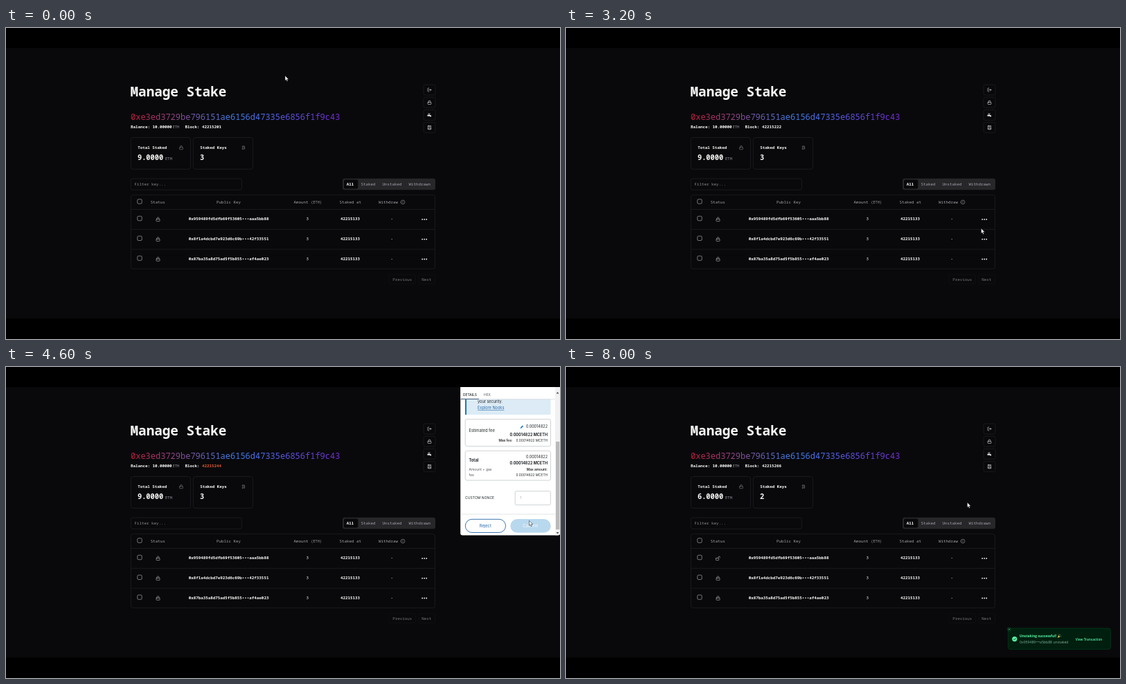
Recreate the animation shown at these times as an HTML page. Size 800 by 450 pixels, loop 8.1 s.

```html
<!DOCTYPE html>
<html lang="en">
<head>
<meta charset="utf-8">
<title>Manage Stake</title>
<style>
  html, body { margin: 0; width: 100%; height: 100%; overflow: hidden; background: #000; }
  svg { display: block; width: 100vw; height: 100vh; }
  text { white-space: pre; }
  .mono { font-family: "Noto Sans Mono", "DejaVu Sans Mono", monospace; }
  .wallet { font-family: Inter, sans-serif; }
  .toast { font-family: "Open Sans", sans-serif; }
  .icon { fill: none; stroke-width: 2; stroke-linecap: round; stroke-linejoin: round; }
</style>
</head>
<body>
<svg id="stage" viewBox="0 0 800 450"></svg>
<script>
const LOOP = 8100, STEP = 100;
const GREY = '#a1a1aa', WHITE = '#fafafa', EDGE = '#222226', BLUE = '#2767a8';

const text = (x, y, s, { size = 5.85, fill = WHITE, weight = 500, anchor = 'start', id = '', extra = '' } = {}) =>
  `<text x="${x}" y="${y}" font-size="${size}" fill="${fill}" font-weight="${weight}" text-anchor="${anchor}"${id && ` id="${id}"`} ${extra}>${s}</text>`;
const box = (x, y, x2, y2, r, stroke, fill = 'none', extra = '') =>
  `<rect x="${x}" y="${y}" width="${x2 - x}" height="${y2 - y}" rx="${r}" stroke="${stroke}" fill="${fill}" stroke-width=".7" ${extra}/>`;
const line = (x, y, x2, color, w = .7) =>
  `<path d="M${x} ${y}H${x2}" stroke="${color}" stroke-width="${w}"/>`;

// Icons on a 24-unit grid, centred on x, y
const ICONS = {
  exit: 'M9 21H5a2 2 0 0 1-2-2V5a2 2 0 0 1 2-2h4M16 17l5-5-5-5M21 12H9',
  lock: 'M5 11H19a2 2 0 0 1 2 2V20a2 2 0 0 1-2 2H5a2 2 0 0 1-2-2V13a2 2 0 0 1 2-2ZM7 11V7a5 5 0 0 1 10 0v4',
  open: 'M3 11H14a2 2 0 0 1 2 2V20a2 2 0 0 1-2 2H3a2 2 0 0 1-2-2V13a2 2 0 0 1 2-2ZM13 11V7a4.500 4.500 0 0 1 9 0v2',
  tap: 'M3 12H14q7 0 7 8H16q0-3-3-3H3ZM10 11V6M5 5H15',
  book: 'M6 2H20V22H6a2 2 0 0 1-2-2V4a2 2 0 0 1 2-2ZM4 18H20M9 7H15M9 11H15',
  binary: 'M14 16a2 2 0 0 1 4 0v2a2 2 0 0 1-4 0ZM6 6a2 2 0 0 1 4 0v2a2 2 0 0 1-4 0ZM6 20h4M14 10h4M6 14h2v6M14 4h2v6',
  info: 'M2 12a10 10 0 1 0 20 0a10 10 0 1 0-20 0M12 16V11M12 8V7.900',
  pencil: 'M3 21l1-6L16 3l5 5L9 20Z'
};
const icon = (name, x, y, size = 7, color = WHITE, extra = '') =>
  `<path class="icon" d="${ICONS[name]}" stroke="${color}" transform="translate(${x} ${y}) scale(${size / 24}) translate(-12 -12)" ${extra}/>`;

function page() {
  let s = '<rect y="29" width="800" height="391.500" fill="#09090b"/>';
  s += text(179.5, 98.5, 'Manage Stake', { size: 19.3, weight: 700 });
  s += text(180, 133, '0xe3ed3729be796151ae6156d47335e6856f1f9c43', { size: 12, fill: 'url(#hue)' });
  s += text(180, 145.3, 'Balance: 10.00000', { weight: 600 });
  s += text(241, 145.3, 'ETH', { size: 5, fill: GREY });
  s += text(258.5, 145.3, 'Block:', { weight: 600 }) + text(283, 145.3, '', { weight: 600, id: 'block' });

  ['exit', 'lock', 'tap', 'book'].forEach((name, i) => {
    const y = 89.5 + i * 18.2;
    s += box(603, y - 7.5, 620, y + 7.5, 2.5, EDGE);
    s += icon(name, 611.5, y, 6.5, WHITE, name === 'tap' ? 'style="fill:#fafafa"' : '');
  });

  s += box(180.3, 158.5, 266.5, 204.3, 3.5, EDGE) + box(270.3, 158.5, 356.5, 204.3, 3.5, EDGE);
  s += text(190.3, 174.8, 'Total Staked', { weight: 600 }) + icon('lock', 253, 173, 6.5, '#8b8b92');
  s += text(280.3, 174.8, 'Staked Keys', { weight: 600 }) + icon('binary', 343, 173, 7, '#8b8b92');
  s += text(190, 190.8, '', { size: 10.3, weight: 700, id: 'total' });
  s += text(230, 190.6, 'ETH', { size: 5.6, fill: GREY });
  s += text(280, 190.8, '', { size: 10.3, weight: 700, id: 'keys' });

  s += box(180.3, 218, 340.3, 234.2, 2.5, EDGE) + text(185.5, 228, 'Filter key...', { fill: '#8b8b92' });
  s += box(486, 217.7, 620, 234.2, 3, 'none', '#27272a') + box(488, 219.5, 508.3, 232.5, 2, 'none', '#09090b');
  s += text(491.8, 228, 'All', { weight: 600 });
  [[512.5, 'Staked'], [543.5, 'Unstaked'], [581.5, 'Withdrawn']].forEach(([x, label]) =>
    s += text(x, 228, label, { fill: GREY }));

  s += box(180.4, 241.6, 619.4, 348.6, 3, EDGE);
  const head = { fill: GREY };
  [[208.8, 'Status'], [304, 'Public Key'], [415.5, 'Amount'], [481.5, 'Staked at'], [538, 'Withdraw']]
    .forEach(([x, label]) => s += text(x, 253.8, label, head));
  s += text(440.5, 253.8, '(ETH)', { size: 5.1, fill: GREY }) + icon('info', 573, 252, 7, GREY);
  const check = y => box(189.8, y - 3.2, 196.2, y + 3.2, 1.5, '#a8a8ad');
  s += check(251);
  ['959489fd5dfb69f53605•••aaa5bb88', '8f1a4dcbd7e923d6c69b•••42f33551', '87ba35a8d75ad5f5b855•••af4ae023']
    .forEach((key, i) => {
      const y = 276.4 + i * 28.8, mid = { anchor: 'middle' };
      s += line(180.5, y - 13.9, 619.5, EDGE) + check(y - .9);
      s += icon('lock', 219.5, y + .4, 6.8, '#c4c4c8', i ? '' : 'id="shut"');
      if (!i) s += icon('open', 219.5, y + .4, 6.8, '#c4c4c8', 'id="freed"');
      s += text(263.7, y + 1.8, '0x' + key, { weight: 600 });
      s += text(435.3, y + 1.8, '3', mid) + text(497, y + 1.8, '42215133', { ...mid, weight: 600 });
      s += text(557.3, y + 1.8, '-', mid);
      [601.2, 604.2, 607.2].forEach(x => s += `<circle cx="${x}" cy="${y + .5}" r=".9" fill="#fafafa"/>`);
    });

  s += box(553, 357, 591.5, 370.3, 2.5, '#141417') + text(558.2, 365.6, 'Previous', { fill: '#77777d' });
  s += box(596, 357, 619.5, 370.3, 2.5, '#141417') + text(600.3, 365.6, 'Next', { fill: '#77777d' });
  s += `<g id="menu">${box(569, 285.3, 618.5, 300, 2.5, '#303034', '#27272a')}${icon('open', 575.7, 292.2, 6.5)}${text(582.3, 294.2, 'Unstake')}</g>`;
  return `<g class="mono">${s}</g>`;
}

function wallet() {
  const ink = '#24272a', soft = '#555a60', edge = '#bbc0c5', fee = '0.00014822', coin = fee + ' MCETH';
  const right = (y, s, size, weight = 400) => text(782, y, s, { size, weight, fill: ink, anchor: 'end' });
  const left = (x, y, s, size = 5.1, o = {}) => text(x, y, s, { size, fill: ink, weight: 400, ...o });
  let s = box(663, 20, 786.5, 69, 1.5, 'none', '#dcebf6') + '<path d="M664 20V69" stroke="#1878c2" stroke-width="2"/>';
  s += left(681, 52, 'your security.', 5.6);
  s += left(681, 61.3, 'Explore Nooks', 5.6, { fill: BLUE, extra: 'text-decoration="underline"' });
  s += box(663.2, 75.5, 786.5, 114.7, 2.5, edge) + left(668.5, 93.5, 'Estimated fee', 5.8);
  s += icon('pencil', 745, 86.6, 5, '#1878c2', 'style="fill:#1878c2"');
  s += right(88.4, fee, 5.5) + right(100.1, coin, 5.5, 700) + right(108.4, coin, 4.75);
  s += left(711.5, 108.4, 'Max fee:', 4.8, { weight: 600 });
  s += box(663.2, 121.3, 786.5, 164, 2.5, edge) + left(668.5, 136.8, 'Total', 5.7, { weight: 700 });
  s += right(132, fee, 5.5) + right(141.3, coin, 5.5, 700) + right(149.8, 'Max amount:', 4.8, 600) + right(158.1, coin, 4.75);
  s += left(668.5, 149.8, 'Amount + gas', 5, { fill: soft }) + left(668.5, 158.1, 'fee', 5, { fill: soft });
  s += left(663, 190.7, 'CUSTOM NONCE') + box(735.2, 179.6, 786.3, 199.6, 2, edge) + left(742, 191.3, '1', 5.1, { fill: '#9fa6ae' });
  s += line(656, 213, 793, '#d6d9dc');
  s += box(663.3, 220.3, 721.5, 239.5, 9.6, BLUE, '#fff', 'style="stroke-width:.9"');
  s += left(692.3, 231.6, 'Reject', 5.8, { fill: BLUE, anchor: 'middle' });
  s += box(728.3, 220, 786.7, 239.8, 9.9, 'none', '#b8d8ee', 'id="confirm"');
  s += left(757.3, 231.6, 'Confirm', 5.8, { fill: '#fff', anchor: 'middle' });

  const head = box(656.5, 29, 793, 46.5, 0, 'none', '#fff') + left(660, 41.7, 'DETAILS', 4.9, { weight: 500 }) +
    left(690, 41.7, 'HEX', 4.9, { fill: soft }) + line(656.5, 46.6, 793, '#d6d9dc') + line(656.5, 46.3, 683, '#3c5878', 1);
  const bar = box(793, 29, 800, 243.5, 0, 'none', '#f1f1f1') + box(794, 108, 799.3, 235, 0, 'none', '#b9b9b9', 'id="thumb"') +
    '<path d="M794.500 38.500l2-2.500 2 2.500ZM794.500 239l2 2.500 2-2.500Z" fill="#505050"/>';
  const loader = '<circle cx="729" cy="103" r="31" fill="#e2761b"/>' +
    '<path id="spin" d="M728 143a5 5 0 1 0 5 5" fill="none" stroke="#f08030" stroke-width="1.300"/>';
  return `<g clip-path="url(#screen)"><g id="popup" class="wallet">
    <rect id="panel" x="656.200" y="0" width="144" height="243.500" rx="3"/>
    <g id="loader">${loader}</g>
    <g id="details" clip-path="url(#sheet)"><g id="scroll">${s}</g>${head}${bar}</g></g></g>`;
}

function toast(done) {
  const key = '0x959489•••a5bb88', mint = '#59f3a6';
  const tone = done ? { bg: '#001f0f', edge: '#003d1c', ink: mint, sub: '#7fae95' }
                    : { bg: '#09090b', edge: EDGE, ink: WHITE, sub: '#a0a0a5' };
  const r = done ? 2.8 : 3.9, d = r * .36;
  let s = box(638.4, 378, 786.6, 408.6, 3.5, tone.edge, tone.bg);
  s += `<circle cx="640" cy="379.600" r="${r}" fill="${tone.bg}" stroke="${done ? '#0b4a29' : '#66666b'}" stroke-width=".6"/>`;
  s += `<path d="M${640 - d} ${379.6 - d}l${2 * d} ${2 * d}m0 ${-2 * d}l${-2 * d} ${2 * d}" stroke="${done ? mint : '#c0c0c4'}" stroke-width=".6"/>`;
  s += done
    ? `<circle cx="647.800" cy="393.600" r="3.600" fill="${mint}"/><path d="M646.200 393.700l1.200 1.200 2.200-2.500" fill="none" stroke="#001f0f" stroke-width=".8"/>`
    : '<circle id="busy" cx="647.500" cy="393.700" r="2.700" fill="none" stroke="#45454a" stroke-width="1" stroke-dasharray=".5 .914"/>';
  s += text(655, 391.3, done ? 'Unstaking successful!' : 'Unstaking...', { size: 4.95, weight: 700, fill: tone.ink });
  if (done) s += '<path d="M709.700 391.800l1.600-3.700 2.200 2.300Z" fill="#d9c75a"/><path d="M713 388.200l1-1M714 389.800h1.200M712 387.500v-1" stroke="#8fd0a0" stroke-width=".7"/>';
  s += text(655, 400.2, done ? key + ' unstaked' : 'Unstaking ' + key, { size: 5.15, weight: 400, fill: tone.sub });
  if (!done) s += box(730.2, 386, 780, 401.3, 2.5, '#1d1d20');
  s += text(755, 395.7, 'View Transaction', { size: 4.75, weight: 600, fill: tone.ink, anchor: 'middle' });
  return `<g id="${done ? 'success' : 'pending'}" class="toast">${s}</g>`;
}

const stage = document.getElementById('stage');
stage.innerHTML = `<defs>
  <linearGradient id="hue" gradientUnits="userSpaceOnUse" x1="180" x2="482">
    <stop stop-color="#c41c3c"/><stop offset=".5" stop-color="#4080ee"/><stop offset="1" stop-color="#7428d4"/></linearGradient>
  <clipPath id="screen"><rect y="29" width="800" height="391.500"/></clipPath>
  <clipPath id="sheet"><rect x="656.200" y="0" width="144" height="243.500" rx="3"/></clipPath>
</defs>${page()}${wallet()}<g clip-path="url(#screen)">${toast(false)}${toast(true)}</g>
<g id="cursor" stroke="#111" stroke-width=".5" fill="#fff" stroke-linejoin="round">
  <path id="arrow" d="M0 0V7.200L1.600 5.700 2.800 8.300 4 7.800 2.900 5.200H5.200Z"/>
  <path id="hand" d="M-.9.600Q0-.500.900.600V3.300L4 4Q4.900 4.300 4.800 5.200L4.200 9H-.8L-3 5.800Q-2.600 4.700-.9 5.900Z"/>
</g>`;

const el = {};
stage.querySelectorAll('[id]').forEach(node => el[node.id] = node);
const show = (node, on) => node.style.display = on ? '' : 'none';
const clamp = v => Math.max(0, Math.min(1, v));
const ramp = (t, a, b) => clamp((t - a) / (b - a));
const smooth = p => p * p * (3 - 2 * p);

// Pointer stops: time, x, y
const PATH = [[0, 403, 69], [100, 403, 69], [900, 604, 274], [1800, 604, 275], [2200, 599.5, 290.5],
  [3600, 599.5, 290], [4000, 702.3, 247.5], [4500, 755.5, 222], [4900, 755.5, 224], [5900, 754.5, 227.5],
  [6350, 754.5, 227.5], [6800, 577.6, 198.3], [8000, 579.4, 196], [LOOP, 579.4, 196]];
const BLOCKS = [[0, 42215201], [1600, 42215222], [4500, 42215244], [7200, 42215266]];
const FLASH = 700;

function draw(t) {
  const i = PATH.findIndex(p => p[0] > t), [t0, x0, y0] = PATH[i - 1], [t1, x1, y1] = PATH[i];
  const p = smooth(ramp(t, t0, t1));
  el.cursor.setAttribute('transform', `translate(${x0 + (x1 - x0) * p} ${y0 + (y1 - y0) * p})`);
  const hand = (t >= 900 && t < 2600) || (t >= 4900 && t < 6400);
  show(el.hand, hand);
  show(el.arrow, !hand);

  const [since, block] = BLOCKS.filter(b => b[0] <= t).pop();
  const heat = since ? 1 - smooth(ramp(t - since, 200, FLASH)) : 0;
  el.block.textContent = block;
  el.block.setAttribute('fill', `rgb(${250 - 20 * heat},${250 - 160 * heat},${250 - 200 * heat})`);
  const settled = t >= 7200;
  el.total.textContent = settled ? '6.0000' : '9.0000';
  el.keys.textContent = settled ? '2' : '3';
  show(el.shut, t < 7300);
  show(el.freed, t >= 7300);
  show(el.menu, t >= 1900 && t < 2600);

  const loaded = t >= 4200, closing = ramp(t, 6600, 6850), opening = ramp(t, 3200, 3400);
  show(el.popup, t >= 3250 && closing < 1);
  show(el.loader, !loaded);
  show(el.details, loaded && t <= 6600);
  el.panel.setAttribute('fill', loaded ? '#fff' : '#24272a');
  const scale = 1 - .06 * (1 - opening) - .0625 * closing;
  el.popup.setAttribute('opacity', opening * (1 - closing));
  el.popup.setAttribute('transform', `translate(727 113) scale(${scale}) translate(-727 -113)`);
  el.spin.setAttribute('transform', `rotate(${(t - 4000) * .36} 728 148)`);
  const ready = t >= 4900;
  const shift = ready ? -2.5 : 102 * (1 - smooth(ramp(t, 4200, 4500)));
  el.scroll.setAttribute('transform', `translate(0 ${shift})`);
  el.thumb.setAttribute('y', 108 - shift * .65);
  el.confirm.setAttribute('fill', ready ? '#2b66a6' : '#b8d8ee');

  const rise = 1 - (1 - ramp(t, 6400, 6800)) ** 3;
  show(el.pending, t > 6400 && !settled);
  show(el.success, settled);
  el.pending.setAttribute('opacity', rise);
  el.pending.setAttribute('transform', `translate(0 ${40 * (1 - rise)})`);
  el.busy.setAttribute('transform', `rotate(${t * .3} 647.5 393.7)`);
}

const start = performance.now();
function tick(now) {
  const t = Math.max(0, now - start) % LOOP;
  draw(Math.floor(t / STEP) * STEP);
  requestAnimationFrame(tick);
}
draw(0);
requestAnimationFrame(tick);
</script>
</body>
</html>
```
